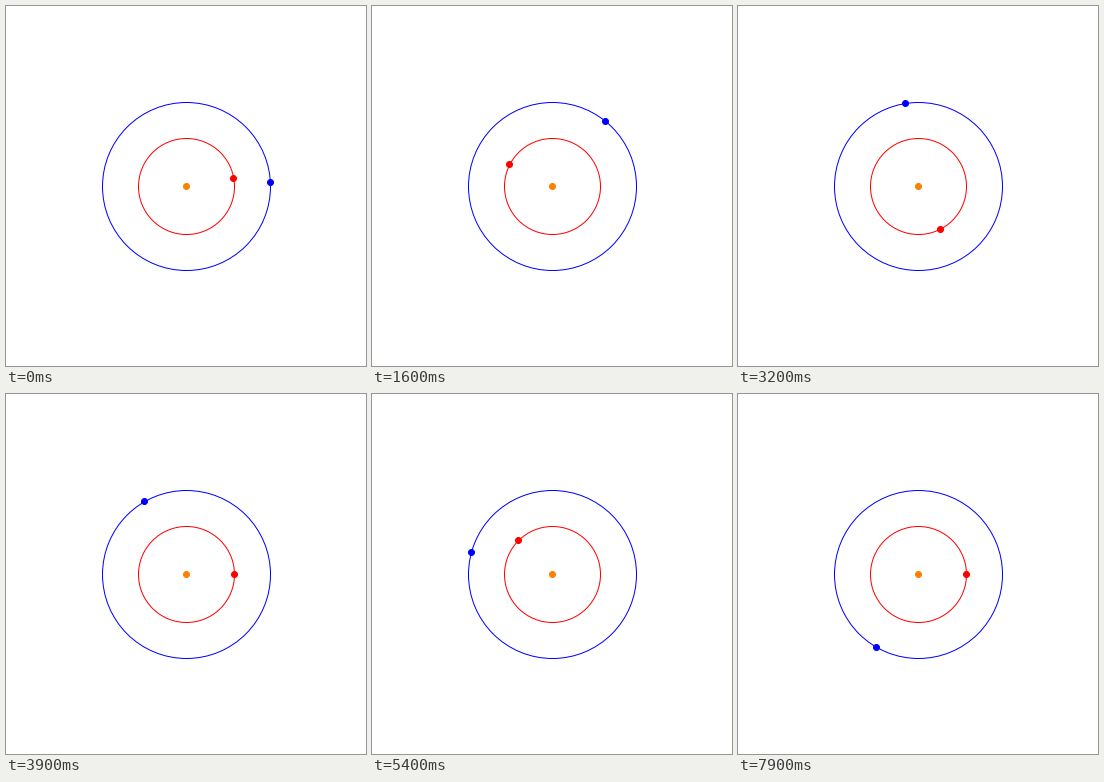
Recreate the animation shown at these times as a matplotlib script. Size 360 by 360 pixels, loop 8 s.

```python
import numpy as np
import matplotlib.pyplot as plt
from matplotlib.animation import FuncAnimation

FRAMES, INTERVAL = 80, 100
UNIT = 12  # pixels (and points) per data unit
# colour, orbit radius, degrees per step
PLANETS = [("blue", 7, 3), ("red", 4, 9)]

fig = plt.figure(figsize=(5, 5), dpi=72, facecolor="white")
ax = fig.add_axes([0, 0, 1, 1])
ax.set(xlim=(-15, 15), ylim=(-15, 15), aspect="equal")
ax.axis("off")


def add_circle(color, size=6, face=None):
    # markers are centred on whole pixels, so dots and orbits line up
    circle, = ax.plot([0], [0], "o", ms=size, mew=1, mec=color,
                      mfc=face or color)
    return circle


for color, radius, _ in PLANETS:
    add_circle(color, size=2 * radius * UNIT, face="none")

add_circle("#ff7f00")
dots = [add_circle(color) for color, _, _ in PLANETS]


def update(i):
    for dot, (_, radius, step) in zip(dots, PLANETS):
        angle = np.radians(step * (i + 1))
        dot.set_data([radius * np.cos(angle)], [radius * np.sin(angle)])
    return dots


anim = FuncAnimation(fig, update, frames=FRAMES, interval=INTERVAL,
                     repeat=True, repeat_delay=0, blit=False)
plt.show()
```
